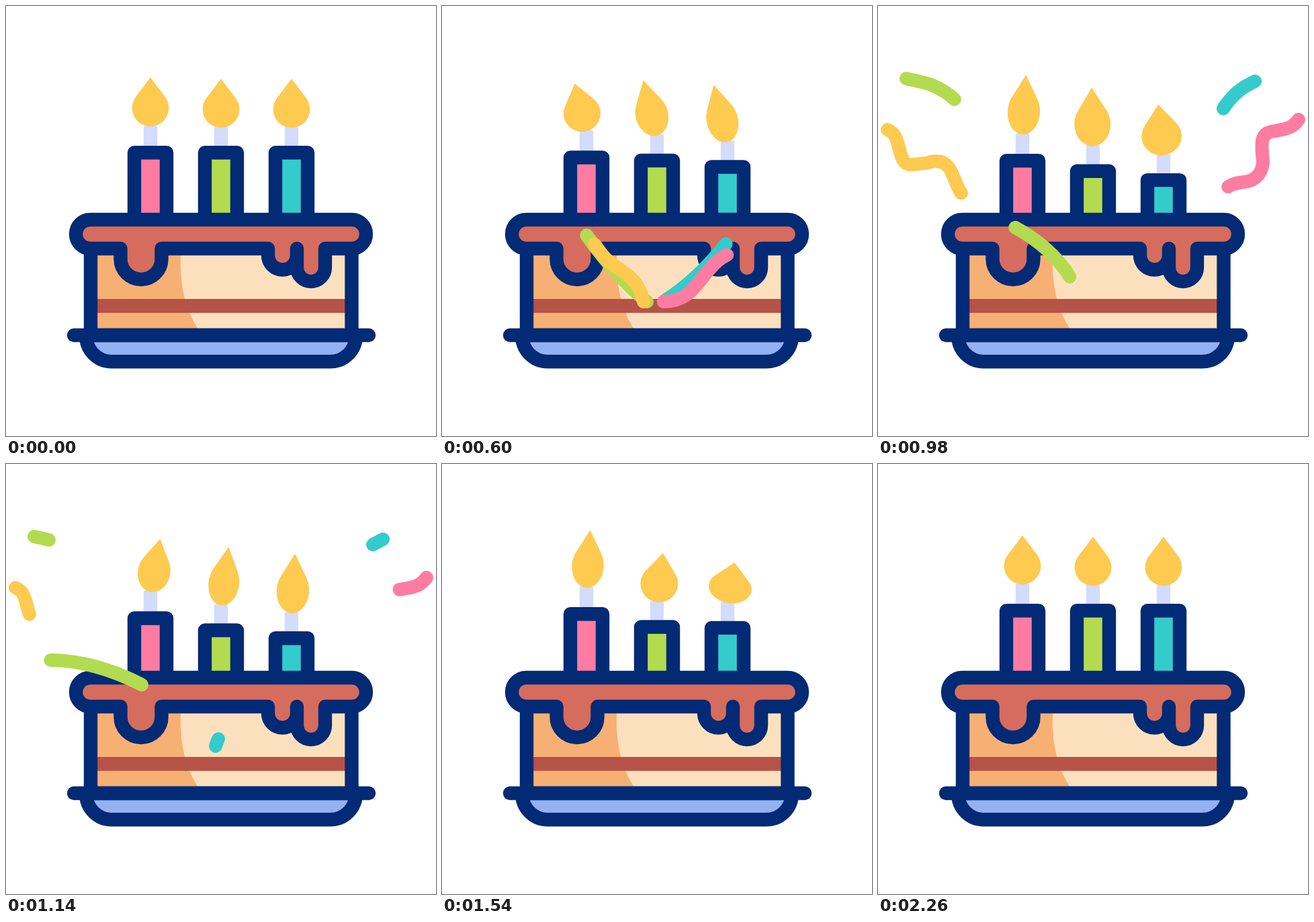
These frames come from a looping animation (640 by 640 pixels, 2400 ms). An HTML page:

```html
<!DOCTYPE html>
<html lang="en">
<head>
<meta charset="utf-8">
<title>Birthday cake</title>
<style>
html, body { margin: 0; width: 100%; height: 100%; overflow: hidden; background: #fff; }
svg { display: block; width: 100%; height: 100%; }
.line { stroke: #032a74; stroke-width: 20.4; stroke-linecap: round; stroke-linejoin: round; }
.ribbon { fill: none; stroke-width: 20; stroke-linecap: round; stroke-linejoin: round; }
</style>
</head>
<body>
<svg viewBox="0 0 640 640">
  <g id="candles"></g>
  <path fill="#fce0be" d="M126 350H514V490H126Z"/>
  <path fill="#f7b073" d="M126 350H262C256 395 262 447 287 482V490H126Z"/>
  <path fill="#b55348" d="M126 436H514V456.8H126Z"/>
  <path class="line" fill="none" d="M126 350V490M514.5 350V490"/>
  <path class="line" fill="#93b1f3" d="M119 490C119 512 136 529.3 157 529.3H483C504 529.3 521 512 521 490Z"/>
  <path class="line" fill="none" d="M101 490H540"/>
  <path class="line" fill="#d66c5d" d="M125.5 318H514.5A21.5 21.5 0 0 1 514.5 361H475V389A21 21 0 0 1 433 389V361V371A21.5 21.5 0 0 1 390 371V361H231.5V376.5A30.5 30.5 0 0 1 170.5 376.5V361H125.5A21.5 21.5 0 0 1 125.5 318Z"/>
  <g id="ribbons"></g>
</svg>
<script>
const LOOP = 2400;
const GREEN = '#b3db4f', TEAL = '#34cbcc', PINK = '#fe7ca2', YELLOW = '#feca50';

function add(parent, name, attrs) {
  const el = document.createElementNS('http://www.w3.org/2000/svg', name);
  for (const key in attrs) el.setAttribute(key, attrs[key]);
  parent.appendChild(el);
  return el;
}

const clamp = p => Math.min(1, Math.max(0, p));
const linear = clamp;
const swing = p => (1 - Math.cos(Math.PI * clamp(p))) / 2;

// Value at time t along [time, value] keys
function track(keys, t, ease) {
  let value = keys[0][1];
  for (let i = 1; i < keys.length; i++) {
    const [t0, a] = keys[i - 1], [t1, b] = keys[i];
    value += (b - a) * ease((t - t0) / (t1 - t0));
  }
  return value;
}

// Flame sway and squash turning points; each candle plays them a little later
const DELAY = 80;
const tilt = [[100, 0], [480, -14], [560, -14], [1250, 12], [1715, 0]];
const tall = [[0, 1], [225, .87], [460, 1.21], [705, .87], [940, 1.22], [1020, 1.22],
  [1350, .82], [1570, 1.2], [1840, 1]];
const wide = [[0, 1], [225, 1.13], [460, .85], [730, 1.14], [1070, .83], [1350, 1.19],
  [1570, .85], [1840, 1]];

const candles = [
  { color: PINK, gap: 29, depth: 12, sink: [100, 980], rise: [980, 2000] },
  { color: GREEN, gap: 27, depth: 29.3, sink: [190, 1130], rise: [1330, 2110] },
  { color: TEAL, gap: 27, depth: 41, sink: [173, 1008], rise: [1176, 2044] }
];
const candleLayer = document.getElementById('candles');
candles.forEach((c, i) => {
  c.x = 215 + 105 * i;
  c.delay = DELAY * i;
  c.dip = [[c.sink[0], 0], [c.sink[1], c.depth], [c.rise[0] + .1, c.depth], [c.rise[1], 0]];
  c.wick = add(candleLayer, 'rect', { x: c.x - 10.2, width: 20.4, height: 45, rx: 3, fill: '#d3dcfc' });
  c.body = add(candleLayer, 'path', { class: 'line', fill: c.color });
  c.flame = add(candleLayer, 'path', {
    fill: YELLOW, d: 'M0 -72.7L-21.7 -44A27.4 27.4 0 1 0 21.7 -44Z'
  });
});

function drawCandle(c, t) {
  const top = 208 + track(c.dip, t, swing);
  const at = keys => track(keys, t - c.delay, swing);
  c.wick.setAttribute('y', top - c.gap - 2);
  c.body.setAttribute('d', `M${c.x - 24} 322V${top + 10.2}H${c.x + 24}V322`);
  c.flame.setAttribute('transform',
    `translate(${c.x} ${top - c.gap}) rotate(${at(tilt)}) scale(${at(wide)} ${at(tall)})`);
}

// Each ribbon runs along four joined pieces of path, head first, then tail
const ribbons = [
  { color: GREEN, start: 490, pace: 1, parts: [
    'M305 440C245 390 165 290 143 187', 'C134 155 112 131 81 118', 'Q74 115 64 113', 'L42 108'] },
  { color: TEAL, start: 490, pace: 1, parts: [
    'M330 440C415 385 478 290 496 195', 'C503 168 515 146 534 129', 'Q540 124 546 120', 'L561 112'] },
  { color: YELLOW, start: 490, pace: 1, parts: [
    'M300 440C290 395 258 395 240 372S222 345 213 334',
    'C196 326 206 284 172 283C158 283 152 293 137 288C110 280 118 232 88 231C80 230 76 234 70 234',
    'C50 236 40 240 35 224', 'C29 208 30 190 14 184'] },
  { color: PINK, start: 490, pace: 1, parts: [
    'M330 440C370 440 380 410 400 390C420 365 440 368 459 354',
    'C478 337 508 350 514 318C517 300 506 288 516 274C532 254 556 272 570 245C574 237 573 230 572 221',
    'C570 200 572 190 585 187', 'C605 183 615 184 626 169'] },
  { color: GREEN, start: 815, pace: 1, parts: [
    'M298 439C295 400 251 353 199 327', 'C156 305 107 291 62 292', 'Q50 292 40 294', 'L20 297'] },
  { color: TEAL, start: 1133, pace: .55, parts: [
    'M312 420C321 385 375 350 431 329', 'C475 306 525 291 570 292', 'Q586 292 596 294', 'L616 297'] }
];
const ribbonLayer = document.getElementById('ribbons');
for (const r of ribbons) {
  r.el = add(ribbonLayer, 'path', { class: 'ribbon', stroke: r.color });
  const len = r.parts.map((_, i) => {
    r.el.setAttribute('d', r.parts.slice(0, i + 1).join(''));
    return r.el.getTotalLength();
  });
  r.head = [[0, 0], [330, len[1]], [490, len[3]]];
  r.tail = [[110, 0], [330, len[0]], [650, len[2]], [700, len[3]]];
}

function drawRibbon(r, t) {
  const age = (t - r.start) / r.pace;
  const shown = age > 0 && age < 700;
  r.el.style.display = shown ? '' : 'none';
  if (!shown) return;
  const tail = track(r.tail, age, linear);
  const length = Math.max(.1, track(r.head, age, linear) - tail);
  r.el.setAttribute('stroke-dasharray', `${length} 3000`);
  r.el.setAttribute('stroke-dashoffset', -tail);
}

function draw(t) {
  candles.forEach(c => drawCandle(c, t));
  ribbons.forEach(r => drawRibbon(r, t));
}

let begin = null;
function tick(now) {
  if (begin === null) begin = now;
  draw((now - begin) % LOOP);
  requestAnimationFrame(tick);
}
draw(0);
requestAnimationFrame(tick);
</script>
</body>
</html>
```
